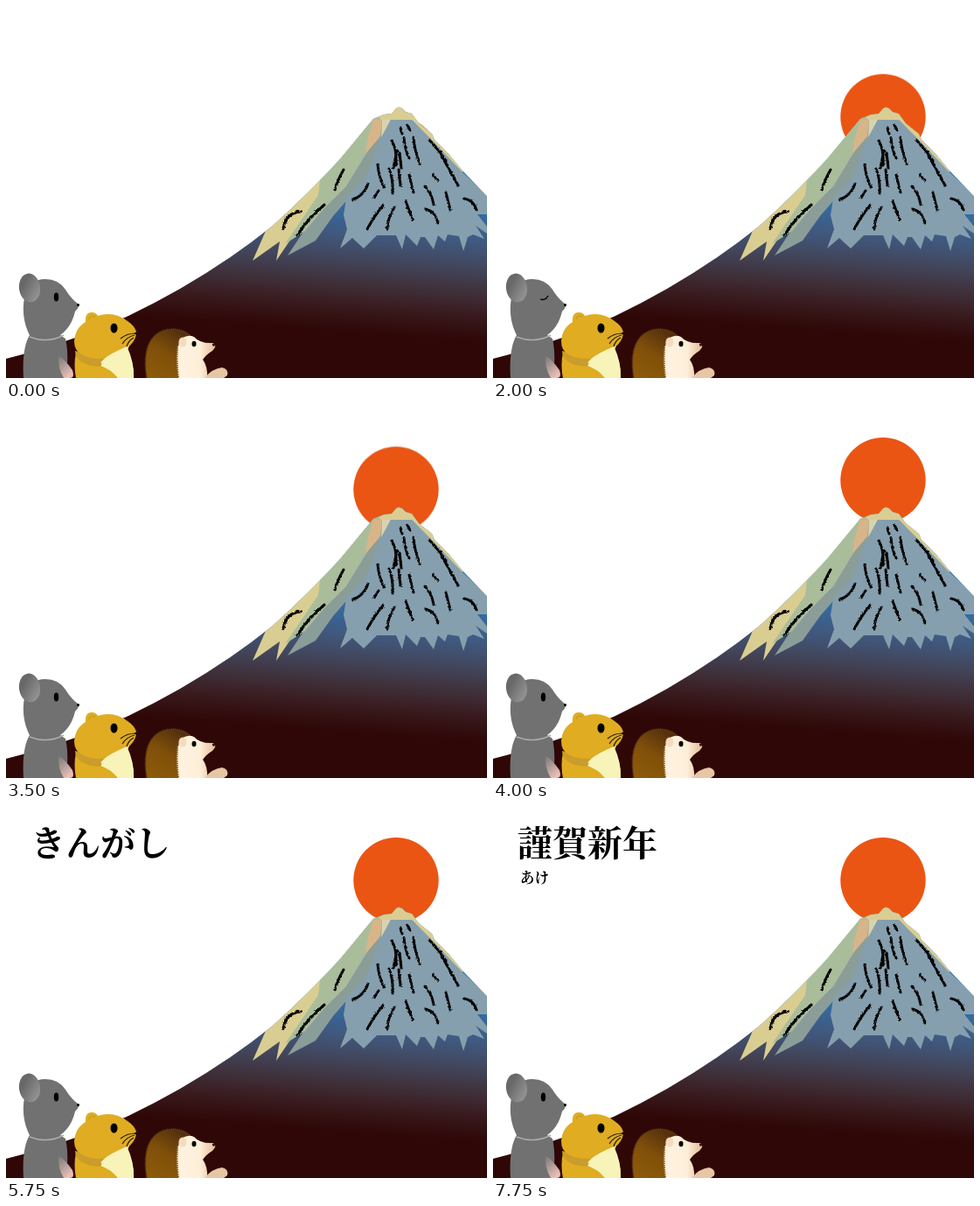
Animation of 550 by 425 pixels, one loop 8000 ms. Source, as an HTML page:

```html
<!DOCTYPE html>
<html lang="ja">
<head>
<meta charset="utf-8">
<title>謹賀新年</title>
<style>
html, body { margin: 0; width: 100%; height: 100%; overflow: hidden; background: #fff; }
svg { position: absolute; left: 0; top: 0; width: 550px; height: 425px; }
.line {
  position: absolute; left: 28px; top: 15px; height: 49px; overflow: hidden; white-space: nowrap;
  font: bold 40px/49px "Noto Serif CJK JP", "Noto Serif JP", "Noto Sans CJK JP", "Noto Sans CJK", serif;
  color: #000;
}
.small { left: 31px; top: 69px; height: 24px; font-size: 16.5px; line-height: 24px; }
#sun, .open, .shut, .line { animation: 8s step-end infinite; }
#sun { animation-name: rise; }
.line.kana { animation-name: kana; }
.line.kanji { animation-name: kanji; }
.line.small { animation-name: small; }
.mouse .open { animation-name: mouse-open; }
.mouse .shut { animation-name: mouse-shut; }
.hog .open { animation-name: hog-open; }
.hog .shut { animation-name: hog-shut; }

@keyframes rise {
  0% { transform: translateY(90px); animation-timing-function: steps(4); }
  12.5% { transform: translateY(58.5px); animation-timing-function: steps(4); }
  25% { transform: translateY(41.7px); animation-timing-function: steps(8); }
  50%, 100% { transform: none; }
}
@keyframes kana {
  0% { width: 0; }
  62.5% { width: 40px; animation-timing-function: steps(6); }
  81.25% { width: 280px; }
  84.375%, 100% { width: 0; }
}
@keyframes kanji { 0% { opacity: 0; } 84.375%, 100% { opacity: 1; } }
@keyframes small { 0% { width: 0; } 93.75% { width: 16.5px; } 96.875%, 100% { width: 33px; } }
@keyframes mouse-open { 0% { opacity: 1; } 25% { opacity: 0; } 28.125%, 100% { opacity: 1; } }
@keyframes mouse-shut { 0% { opacity: 0; } 25% { opacity: 1; } 28.125%, 100% { opacity: 0; } }
@keyframes hog-open { 0% { opacity: 1; } 37.5% { opacity: 0; } 40.625%, 100% { opacity: 1; } }
@keyframes hog-shut { 0% { opacity: 0; } 37.5% { opacity: 1; } 40.625%, 100% { opacity: 0; } }
</style>
</head>
<body>
<svg viewBox="0 0 550 425">
  <defs>
    <linearGradient id="slope" gradientUnits="userSpaceOnUse" x1="420" y1="215" x2="407" y2="385">
      <stop offset="0" stop-color="#2d74b0"/>
      <stop offset=".27" stop-color="#40597f"/>
      <stop offset=".44" stop-color="#42465c"/>
      <stop offset=".62" stop-color="#3f2e37"/>
      <stop offset=".77" stop-color="#38191c"/>
      <stop offset=".93" stop-color="#2f0707"/>
    </linearGradient>
    <linearGradient id="ear" x1="0" y1="0" x2="1" y2="1">
      <stop offset=".3" stop-color="#686868"/>
      <stop offset="1" stop-color="#a0a0a0"/>
    </linearGradient>
    <linearGradient id="paw" x1="0" y1="0" x2=".6" y2="1">
      <stop offset="0" stop-color="#777"/>
      <stop offset="1" stop-color="#ecc0b8"/>
    </linearGradient>
    <linearGradient id="spines" x1="0" y1="1" x2=".6" y2="0">
      <stop offset="0" stop-color="#8f5c0a"/>
      <stop offset=".55" stop-color="#80500a"/>
      <stop offset="1" stop-color="#55300f"/>
    </linearGradient>
    <linearGradient id="face" x1="0" y1="0" x2="1" y2="0">
      <stop offset="0" stop-color="#fff3e0"/>
      <stop offset=".6" stop-color="#fdeed8"/>
      <stop offset="1" stop-color="#e2bb98"/>
    </linearGradient>
    <filter id="rough" filterUnits="userSpaceOnUse" x="300" y="120" width="250" height="160" color-interpolation-filters="sRGB">
      <feTurbulence type="fractalNoise" baseFrequency=".4" numOctaves="2" seed="4"/>
      <feDisplacementMap in="SourceGraphic" scale="3" xChannelSelector="R" yChannelSelector="G"/>
    </filter>
    <path id="hill" d="M0 403Q70 386 140 354Q230 311 305 251Q345 215 381 176L420 129L432 124L441 123L446 117L449 115.500L453 117L457 121L464 123L472 134L487 146L490 153L507 170L521 187L550 217.500V425H0Z"/>
    <clipPath id="hillside"><use href="#hill"/></clipPath>
  </defs>

  <circle id="sun" cx="446" cy="84.800" r="48.700" fill="#ea5514"/>

  <use href="#hill" fill="url(#slope)"/>

  <g clip-path="url(#hillside)">
    <path fill="#dacd91" d="M282 291L300 250L420 110H475L530 187L520 190L465 131H437L416 170L328 263L309 291L313 269Z"/>
    <path fill="#8b9d99" d="M424 131L440 130L432 182L388 224L374 240L354 268L322 285L340 258L412 165Z"/>
    <path fill="#aabd9b" d="M420 120L429 130L414 165L389 206L364 231L342 257L319 272L336 247L357 216L360 190Z"/>
    <path fill="#d8b588" d="M420 130H430L428 149L411 169L414 150Z"/>
    <path fill="#d7d3ae" d="M430 130H440L429 151Z"/>
    <path fill="#869fae" d="M440 130H464L487 153L521 189L560 226V238L539 238L550 252V260L537 251L547 266L534 261L528 264L523 280L518 263L505 261L502 269L494 262L489 278L479 264L474 264L470 274L457 261L453 278L446 262L424 262L409 277L396 265L382 277L390 255L386 239L389 220L412 195L428 152Z"/>
  </g>

  <path filter="url(#rough)" fill="none" stroke="#050505" stroke-width="3" stroke-linecap="round" d="
    M451 139L453 146M459 136L462 142M455 150Q456 164 461 174M466 150Q467 165 473 180
    M441 154Q447 163 446 182M447 165L443 185M450 168L452 185M484 153Q497 167 503 177M498 171L517 205
    M425 181Q426 194 432 207M438 186Q443 199 442 214M449 187L451 205M461 193L466 213
    M488 193L494 199M479 206Q487 214 489 227M503 213L508 233M524 220Q535 222 538 233
    M480 232Q491 235 494 248M457 223L465 244M444 230Q436 243 436 255M431 228Q421 240 413 255
    M426 211L421 219M414 203Q410 216 397 221M386 187Q379 199 376 210
    M364 227Q345 243 333 262M337 235Q320 236 317 254"/>

  <g class="mouse">
    <path fill="#717171" d="M27 376Q17 357 21 333Q26 312 45 312Q60 312 68 324Q74 334 83 341Q84 344 79 349Q75 367 62 376L68 380Q72 397 69 425H20Q18 391 27 376Z"/>
    <ellipse cx="27" cy="322" rx="12" ry="16.500" transform="rotate(-8 27 322)" fill="url(#ear)"/>
    <path fill="none" stroke="#aaa" stroke-width="1.600" d="M27 378Q48 386 66 376"/>
    <path fill="url(#paw)" d="M60 400Q66 402 76 416Q79 425 73 425H66Q59 413 60 400Z"/>
    <ellipse class="open" cx="57.500" cy="332.500" rx="2.700" ry="5"/>
    <path class="shut" fill="none" stroke="#000" stroke-width="1.300" d="M54 335Q60 337 63 331"/>
    <circle cx="82.500" cy="341.500" r="1.500"/>
  </g>

  <g class="hamster">
    <path fill="#dfac22" d="M80 396Q77 410 80 425H146Q147 408 138 392Z"/>
    <path fill="#f8f3b8" d="M108 408Q126 402 138 388Q147 408 146 425H128Q120 415 108 411Z"/>
    <path fill="#c99c2b" d="M79 394Q79 410 108 412L112 403Z"/>
    <path fill="#dfac22" d="M91 361Q90 350 98 350Q103 350 105 354Q123 348 139 360Q149 367 149 374Q148 384 138 391Q126 402 109 403Q78 403 78 383Q79 368 91 361Z"/>
    <path fill="#f8f3b8" d="M108 408Q113 399 141 388Q137 400 126 406Z"/>
    <path fill="none" stroke="#c2911b" d="M95 358Q96 352 102 355"/>
    <ellipse cx="123.500" cy="368" rx="4" ry="5.500"/>
    <path fill="none" stroke="#21180b" stroke-width="1.200" d="M148 374Q138 374 131 380M147 376Q138 378 133 386M146 379Q140 382 138 389"/>
    <circle cx="148.500" cy="374" r="1.300"/>
  </g>

  <g class="hog">
    <path fill="url(#spines)" d="M161 425Q155 389 172 375Q187 365 204 372Q213 376 215 384L204 400V425Z"/>
    <path fill="none" stroke="#68420f" stroke-width="2" stroke-dasharray="1 1.300" d="M161 425Q155 389 172 375Q187 365 204 372Q212 376 215 383"/>
    <path fill="url(#face)" d="M198 425Q195 398 198 383Q206 374 215 378Q222 386 237 385Q242 388 236 394Q229 398 225 404Q231 412 230 425Z"/>
    <path fill="none" stroke="#fff0da" stroke-width="4" stroke-dasharray="1 1.500" d="M198 389Q196 406 199 425"/>
    <ellipse cx="202" cy="384" rx="4.500" ry="5.500" fill="#f3dcc0"/>
    <path fill="#e8c5a4" d="M227 425Q236 414 247 413Q255 415 253 422L249 425Z"/>
    <ellipse class="open" cx="215" cy="386" rx="2.500" ry="3.200"/>
    <path class="shut" fill="none" stroke="#111" stroke-width="1.300" d="M210 386Q214 389 218 385"/>
    <circle cx="237.500" cy="387" r="1.700" fill="#34180e"/>
  </g>
</svg>
<div class="line kana">きんがしんねん</div>
<div class="line kanji">謹賀新年</div>
<div class="line small">あけ</div>
</body>
</html>
```
